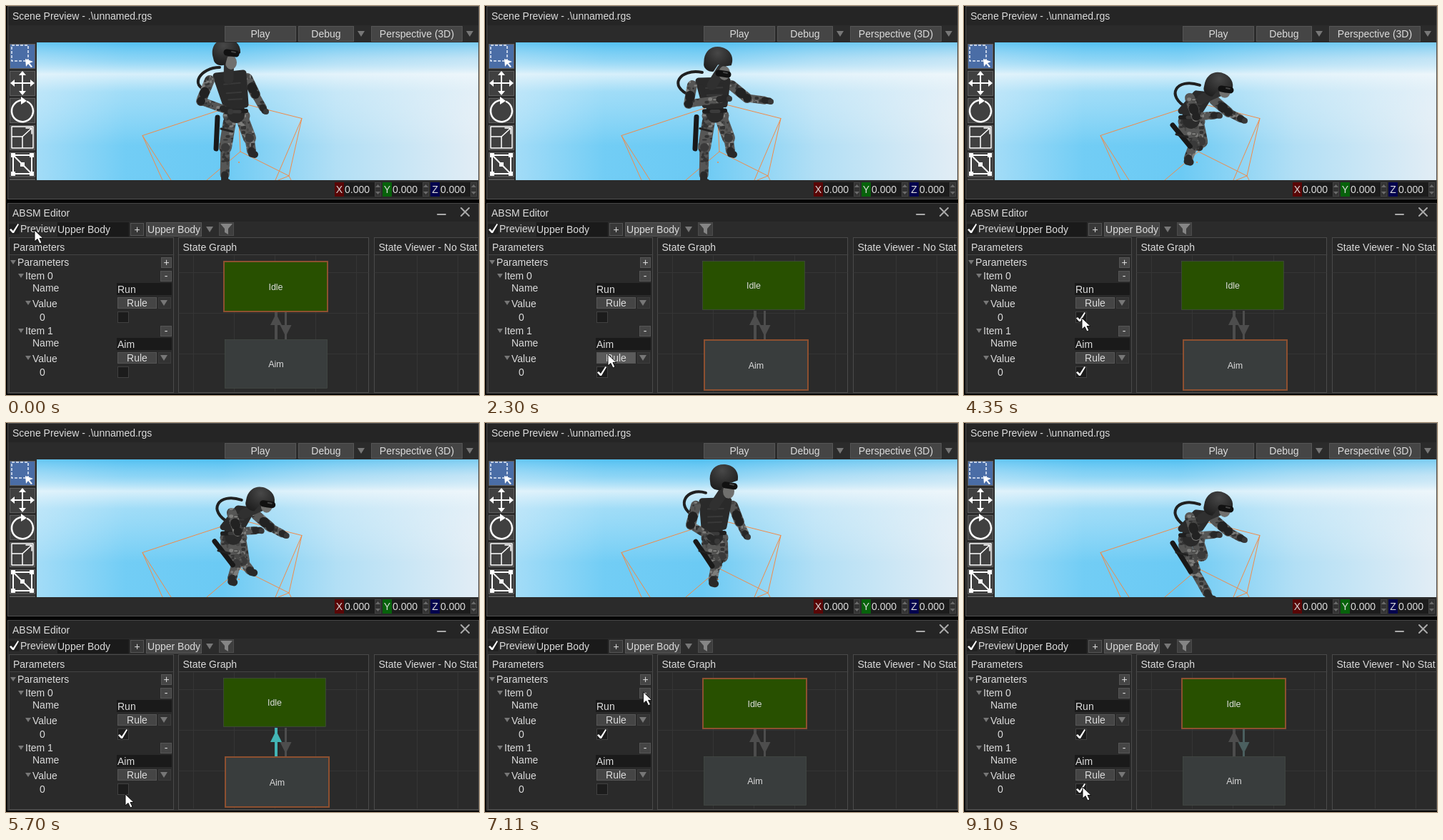
An HTML page that plays this animation: 662 by 545 pixels, repeating every 9180 ms.

```html
<!DOCTYPE html>
<html lang="en">
<head>
<meta charset="utf-8">
<title>Animation state machine preview</title>
<style>
  html, body { margin: 0; width: 100%; height: 100%; overflow: hidden; background: #050505; }
  svg { display: block; width: 662px; height: 545px; }
  text { font: 14px "Liberation Sans", Arial, sans-serif; fill: #dcdcdc; white-space: pre; }
  .node { font-size: 12.5px; text-anchor: middle; }
  .mid { text-anchor: middle; }
  .line { fill: none; stroke-linecap: round; stroke-linejoin: round; }
</style>
</head>
<body>
<svg viewBox="0 0 662 545" xmlns="http://www.w3.org/2000/svg">
  <defs>
    <linearGradient id="sky">
      <stop offset="0" stop-color="#a3dcf7"/><stop offset=".2" stop-color="#72cdf5"/>
      <stop offset=".42" stop-color="#6bcaf4"/><stop offset=".68" stop-color="#b2dff5"/>
      <stop offset="1" stop-color="#e2edf5"/>
    </linearGradient>
    <linearGradient id="haze" x2="0" y2="1">
      <stop offset="0" stop-color="#43baf0" stop-opacity=".65"/><stop offset=".12" stop-color="#a5dcf6" stop-opacity=".5"/>
      <stop offset=".23" stop-color="#f0f8fc" stop-opacity=".8"/><stop offset=".36" stop-color="#e6f4fb" stop-opacity=".4"/>
      <stop offset=".75" stop-color="#fff" stop-opacity="0"/>
    </linearGradient>
    <pattern id="camo" width="48" height="48" patternUnits="userSpaceOnUse"></pattern>
    <radialGradient id="helmet" cx=".4" cy=".25" r=".8">
      <stop offset="0" stop-color="#484848"/><stop offset=".5" stop-color="#303030"/><stop offset="1" stop-color="#1b1b1b"/>
    </radialGradient>
    <clipPath id="view"><rect x="43" y="51" width="618" height="193"/></clipPath>
  </defs>
  <g id="ui"></g>
  <g clip-path="url(#view)">
    <rect x="43" y="51" width="618" height="193" fill="url(#sky)"/>
    <rect x="43" y="51" width="618" height="193" fill="url(#haze)"/>
    <path class="line" stroke="#f08a48" d="M219 244L191 181.500L329 136L414 157.500L377 244M191 181.500L231 244M414 157.500L396 238L328 204L281 244M325 140L328 204M396 238L381 244M396 238L399 244"/>
    <circle cx="326" cy="219" r="1" fill="#f08a48"/>
    <g id="soldier"></g>
  </g>
  <g id="graph"></g>
  <g id="live"></g>
  <path id="cursor" d="M0 0V16L4 12.5L7 19L10 17.5L7 11.5H12Z" fill="#fff" stroke="#111"/>
</svg>
<script>
const LOOP = 9180;
const $ = id => document.getElementById(id);
const rect = (x, y, w, h, fill, stroke, width = 1) =>
  `<rect x="${x}" y="${y}" width="${w}" height="${h}" fill="${fill}"${stroke ? ` stroke="${stroke}" stroke-width="${width}"` : ''}/>`;
const text = (x, y, s, cls = '') => `<text x="${x}" y="${y}" class="${cls}">${s}</text>`;
const line = (d, color, width = 1) => `<path class="line" d="${d}" stroke="${color}" stroke-width="${width}"/>`;
const fill = (d, color) => `<path d="${d}" fill="${color}"/>`;
const down = (x, y, r = 5) => fill(`M${x - r} ${y - r + 1}h${2 * r}l${-r} ${2 * r - 2}z`, '#777');
const button = (x, y, w, h, label, base, color = '#454545') =>
  rect(x + .5, y + .5, w - 1, h - 1, color, '#555') + text(x + w / 2, base, label, 'mid');
const check = (x, y) => fill(`M${x + 1} ${y + 8.5}l2-1.500 3 3 6.500-10 1.500 1-7 12h-2z`, '#fff');

// Irregular blotches from a small seeded generator
function camouflage() {
  let seed = 7;
  const rnd = n => (seed = seed * 16807 % 2147483647) / 2147483647 * n;
  let s = rect(0, 0, 48, 48, '#565655');
  for (let i = 0; i < 110; i++)
    s += `<ellipse cx="${rnd(48).toFixed(1)}" cy="${rnd(48).toFixed(1)}" rx="${(1 + rnd(3)).toFixed(1)}" ry="${(1 + rnd(2)).toFixed(1)}" fill="${['#333', '#7d7d7b', '#474746'][i % 3]}"/>`;
  return s;
}

function scenePanel() {
  let s = rect(2.5, .5, 659, 270, '#2b2b2b', '#505050') + rect(3, 1, 658, 26, '#252525') +
    text(9, 19, 'Scene Preview - .\\unnamed.rgs') +
    button(306, 28, 100, 22, 'Play', 44) + button(409, 28, 78, 22, 'Debug', 44) + down(497, 39) +
    button(511, 28, 128, 22, 'Perspective (3D)', 44) + down(649, 39);
  for (let i = 0; i < 5; i++)
    s += rect(5.5, 53.5 + 38 * i, 35, 34, i ? '#404040' : '#4a6da6', '#606060');
  s += rect(5, 242, 36, 2, '#555');
  s += '<rect x="8" y="55" width="23" height="22" fill="none" stroke="#e8eefa" stroke-width="1.5" stroke-dasharray="4 2"/>' +
    fill('M27 74l11 4-5 2 4 5-2 1-4-5-3 4z', '#fff') +
    line('M23 95V121M10 108H36', '#fff', 2) +
    fill('M23 91l5 6h-10zM23 125l5-6h-10zM6 108l6-5v10zM40 108l-6-5v10z', '#fff') +
    line('M12 137A15 15 0 1 0 30 134', '#fff', 2.5) + line('M12 137A15 15 0 0 1 23 132', '#fff', 2.5) +
    fill('M21 127l8 6-8 5z', '#fff') +
    line('M8 169H38V199H8ZM8 183H23V199', '#fff', 1.5) + line('M23 183L35 172M28 171H36V179', '#fff', 1.5) +
    line('M10 209H36V235H10ZM10 209L36 235', '#fff', 2);
  for (const [x, y] of [[10, 209], [36, 209], [10, 235], [36, 235], [23, 222]])
    s += rect(x - 3, y - 3, 6, 6, '#fff');
  [['X', '#590606'], ['Y', '#07620b'], ['Z', '#04044e']].forEach(([axis, color], i) => {
    const x = 460 + 67 * i;
    s += rect(x + 13, 247, 43, 20, '#1c1c1c') + rect(x, 247, 13, 20, color) +
      text(x + 6.5, 262, axis, 'mid') + text(x + 14, 262, '0.000') +
      rect(x + 56.5, 247.5, 8, 19, '#333', '#424242') +
      fill(`M${x + 57} 254l3.5-4 3.5 4zM${x + 57} 260l3.5 4 3.5-4z`, '#6a6a6a');
  });
  return s;
}

function item(i, name) {
  const y = Math.round(76.5 * i);
  return down(21, 378 + y, 4) + text(27, 383 + y, 'Item ' + i) + button(216, 371 + y, 16, 15, '-', 383 + y) +
    text(37, 400 + y, 'Name') + rect(155, 388 + y, 77, 17, '#1a1a1a') + text(156, 402 + y, name) +
    down(31, 416 + y, 4) + text(37, 422 + y, 'Value') + rect(213.5, 408.5 + y, 17, 15, '#333', '#3c3c3c') +
    down(221, 416 + y) + text(47, 441 + y, '0') + rect(156.5, 428.5 + y, 15, 15, '#1c1c1c', '#414141');
}

function grid(x0, x1, first) {
  let d = '';
  for (let x = first; x < x1; x += 57) d += `M${x}.5 350V540`;
  for (let y = 373; y < 540; y += 57) d += `M${x0} ${y}.5H${x1}`;
  return line(d, '#353535');
}

function editorPanel() {
  let s = rect(2.5, 276.5, 659, 266, '#2b2b2b', '#484848') + rect(3, 277, 658, 25, '#252525') +
    text(9, 295, 'ABSM Editor') + line('M604 292H615', '#aaa', 2) + line('M637 283L648 294M648 283L637 294', '#aaa', 2) +
    rect(4.5, 305.5, 14, 14, '#1f1f1f') + check(4, 305) + text(20, 317, 'Preview') +
    rect(72, 303, 100, 20, '#1a1a1a') + text(72, 318, 'Upper Body') +
    button(174, 304, 19, 18, '+', 318, '#383838') + button(196, 303, 78, 20, 'Upper Body', 318) + down(285, 313) +
    rect(298.5, 303.5, 20, 18, '#3e3e3e', '#4c4c4c') + fill('M300 305h17l-6 7v8l-5-3v-5z', '#858585');
  for (const [x, w, title] of [[4, 231, 'Parameters'], [241, 267, 'State Graph'], [515, 147, 'State Viewer - No Stat']])
    s += rect(x + .5, 324.5, w - 1, 217, '#2a2a2a', '#4a4a4a') + rect(x + 1, 325, w - 2, 23, '#262626') +
      line(`M${x} 348.5H${x + w}`, '#444') + text(x + (x < 200 ? 6 : 6.5), 343, title);
  return s + down(10, 359, 4) + text(16, 364, 'Parameters') + button(217, 352, 15, 15, '+', 364) +
    item(0, 'Run') + item(1, 'Aim') + grid(242, 507, 262) + grid(516, 660, 575);
}

const clamp = v => Math.max(0, Math.min(1, v));
const ease = v => v * v * (3 - 2 * v);
const ramp = (t, a, b) => ease(clamp((t - a) / (b - a)));
const mix = (a, b, k) => a.map((v, i) => v + (b[i] - v) * k);

const CLICK = { aimOn: 1250, run: 3300, aimOff: 5650, aimAgain: 8430 };
const BLEND = 800;

const cursorPath = [
  [0, 40, 314], [120, 40, 314], [950, 165, 512], [1250, 164, 508], [1900, 165, 508],
  [2300, 172, 488], [2900, 166, 447], [3200, 164, 438], [4350, 165, 437], [4810, 166, 460],
  [5450, 164, 511], [5700, 167, 520], [5860, 168, 519], [6330, 271, 325], [6800, 273, 324],
  [7450, 163, 437], [7650, 163, 439], [7960, 168, 510], [8400, 166, 510], [LOOP, 166, 510]];

function cursorAt(t) {
  const i = cursorPath.findIndex(p => p[0] > t);
  const a = cursorPath[i - 1], b = cursorPath[i];
  return mix(a, b, ease((t - a[0]) / (b[0] - a[0]))).slice(1);
}

// Joints: head, goggles, chin, left shoulder/elbow/hand, right shoulder/elbow/hand, pelvis, hose
const poses = {
  stand: [[308, 65], [316, 66], [315, 82], [285, 104], [273, 133], [312, 147], [338, 101], [349, 124], [362, 147], [322, 152], [264, 104]],
  standAim: [[326, 77], [334, 96], [335, 98], [290, 112], [285, 138], [340, 130], [345, 112], [367, 130], [398, 134], [322, 152], [264, 106]],
  run: [[334, 79], [343, 90], [341, 101], [295, 118], [288, 145], [323, 167], [347, 118], [356, 141], [366, 161], [321, 160], [274, 110]],
  runAim: [[356, 112], [367, 117], [365, 122], [316, 129], [325, 155], [356, 153], [350, 132], [370, 149], [391, 160], [318, 160], [289, 118]]
};
// Knee and foot over one stride, at equal steps
const stride = [[322, 206, 345, 246], [322, 203, 328, 236], [323, 198, 317, 223], [322, 196, 314, 222], [321, 194, 312, 216]];

function strideAt(phase) {
  const n = stride.length, p = (phase % 1 + 1) % 1 * n, i = Math.floor(p);
  return mix(stride[i], stride[(i + 1) % n], p - i);
}

const limb = (pts, color, w) => line('M' + pts.map(p => p.map(v => v.toFixed(1)).join(' ')).join('L'), color, w);
const dot = ([x, y], r, color) => `<circle cx="${x}" cy="${y}" r="${r}" fill="${color}"/>`;
const CAMO = 'url(#camo)', DARK = '#222', VEST = '#2a2a2a';

function leg(hip, knee, foot) {
  const ankle = mix(knee, foot, .8), toe = [foot[0] + 4, foot[1] + 1];
  return limb([hip, knee], CAMO, 18) + limb([knee, ankle], CAMO, 13) +
    limb([ankle, foot, toe], '#292929', 10) + dot(knee, 6, '#3a3a3a');
}

function arm(shoulder, elbow, hand) {
  return limb([shoulder, elbow], CAMO, 14) + limb([elbow, mix(elbow, hand, .8)], CAMO, 11) +
    limb([mix(shoulder, elbow, .55), mix(shoulder, elbow, .65)], DARK, 13) + dot(elbow, 6, DARK) +
    limb([mix(elbow, hand, .78), hand], '#272727', 9) + dot([hand[0] + 2, hand[1] + 1], 4, '#383838');
}

function helmet([x, y], angle) {
  return `<path transform="translate(${x} ${y}) rotate(${angle})" fill="url(#helmet)"
    d="M-19 4C-21-10-12-19 1-19C13-19 21-10 20 1L12 5L2 6L-1 17C-8 20-15 17-17 12Z"/>`;
}

function soldier(t, aim, run) {
  const phase = (t - 9100) / 759;
  const bob = run * 3 * Math.cos(2 * Math.PI * phase) + (1 - run) * Math.sin(t / 480);
  const joints = poses.stand.map((p, i) => {
    const [x, y] = mix(mix(p, poses.standAim[i], aim), mix(poses.run[i], poses.runAim[i], aim), run);
    return [x, y + bob * (i === 9 ? .4 : 1)];
  });
  const [head, goggles, chin, sL, eL, hL, sR, eR, hR, pelvis, hose] = joints;
  const off = ([x, y], dx, dy) => [x + dx, y + dy];
  const a = mix([307, 198, 306, 246], strideAt(phase), run);
  const far = strideAt(phase + .5);
  // The far leg is mostly hidden, so it is foreshortened upwards
  const b = mix([341, 185, 344, 207], [far[0] + 10, far[1] - 12, far[2], far[3] - 36], run);
  const hipA = off(pelvis, -9, 10), hipB = off(pelvis, 10, 9);
  const kneeA = a.slice(0, 2), kneeB = b.slice(0, 2);
  const vest = [off(sL, 9, -6), off(sR, -6, -7), off(pelvis, 13, -14), off(pelvis, -14, -13)];
  const inner = k => [mix(vest[0], vest[3], k), mix(vest[1], vest[2], k)];
  const band = k => limb([mix(...inner(k), .2), mix(...inner(k), .85)], '#393939', 2);

  return line(`M${sL[0] + 14} ${sL[1] - 18}C${hose[0] + 8} ${hose[1] - 18} ${hose[0] - 8} ${hose[1] + 8} ${sL[0] - 3} ${sL[1] + 14}`, '#202020', 4) +
    leg(hipB, kneeB, b.slice(2)) + leg(hipA, kneeA, a.slice(2)) +
    limb([off(hipA, -17, -6 + 3 * run), off(kneeA, -13 + 8 * run, 2)], '#191919', 7) +
    limb([off(hipA, -12, 10), off(hipA, 4, 14)], DARK, 3) +
    limb([off(pelvis, -10, 2), off(pelvis, 11, 2)], CAMO, 17) +
    arm(sR, eR, hR) +
    `<path d="M${vest.join('L')}Z" fill="${VEST}" stroke="${VEST}" stroke-width="9" stroke-linejoin="round"/>` +
    limb([mix(vest[2], vest[3], .5), pelvis], VEST, 24) +
    band(.3) + band(.6) + band(.82) +
    limb([off(pelvis, -15, -4), off(pelvis, 14, -5)], '#1f1f1f', 6) +
    limb([off(pelvis, -5, -4), off(pelvis, 5, -4)], '#3b3b3b', 5) +
    limb([mix(sL, sR, .5), mix(head, chin, .6)], '#303030', 14) + arm(sL, eL, hL) +
    `<ellipse cx="${chin[0]}" cy="${chin[1] - 3}" rx="8" ry="10" fill="#70706e"/>` +
    helmet(head, 18 * aim + 8 * run) +
    limb([off(goggles, -7, -1), off(goggles, 6, 1)], '#111', 9) +
    limb([off(goggles, 0, -2), off(goggles, 5, -1)], '#444', 2);
}

const tint = k => `rgb(${mix([66, 188, 188], [77, 77, 77], clamp(k))})`;

function node(x, y, label, color, active) {
  const w = active ? 145 : 143, h = active ? 70 : 68, shift = active ? 1 : .5;
  return rect(x + shift, y + shift, w, h, color, active ? '#8d5030' : '#48504a', active ? 2 : .6) +
    text(x + shift + w / 2, y + shift + h / 2 + 4.5, label, 'node');
}

function graph(t) {
  const since = start => t < start ? 1 : (t - start) / BLEND;
  const up = tint(since(CLICK.aimOff));
  const dn = tint(Math.min(since(CLICK.aimOn), since(CLICK.aimAgain)));
  const aiming = t >= CLICK.aimOn + BLEND && t < CLICK.aimOff + BLEND;
  return rect(376, 427, 4, 40, up) + fill('M378 431l8 16h-16z', up) +
    rect(390, 427, 3, 40, dn) + fill('M391.5 463l8-16h-16z', dn) +
    node(304, 357, 'Idle', '#285000', !aiming) + node(306, 467, 'Aim', '#393d3d', aiming);
}

function controls(t, [cx, cy]) {
  const aimOn = t >= CLICK.aimOn && t < CLICK.aimOff || t >= CLICK.aimAgain;
  const rule = y => {
    const hover = cx > 156 && cx < 211 && cy > y && cy < y + 16;
    return button(156, y, 55, 16, 'Rule', y + 12.5, hover ? '#5b5b5b' : '#454545');
  };
  return rule(408) + rule(485) + (t >= CLICK.run ? check(156, 429) : '') + (aimOn ? check(156, 505) : '');
}

$('camo').innerHTML = camouflage();
$('ui').innerHTML = scenePanel() + editorPanel();

const began = performance.now();
function frame() {
  const t = (performance.now() - began) % LOOP;
  const aim = ramp(t, CLICK.aimOn, CLICK.aimOn + BLEND) - ramp(t, CLICK.aimOff, CLICK.aimOff + BLEND) +
    ramp(t, CLICK.aimAgain, CLICK.aimAgain + 700);
  const run = ramp(t, CLICK.run, CLICK.run + 550);
  const tip = cursorAt(t);
  $('soldier').innerHTML = soldier(t, aim, run);
  $('graph').innerHTML = graph(t);
  $('live').innerHTML = controls(t, tip);
  $('cursor').setAttribute('transform', `translate(${tip})`);
  requestAnimationFrame(frame);
}
frame();
</script>
</body>
</html>
```
